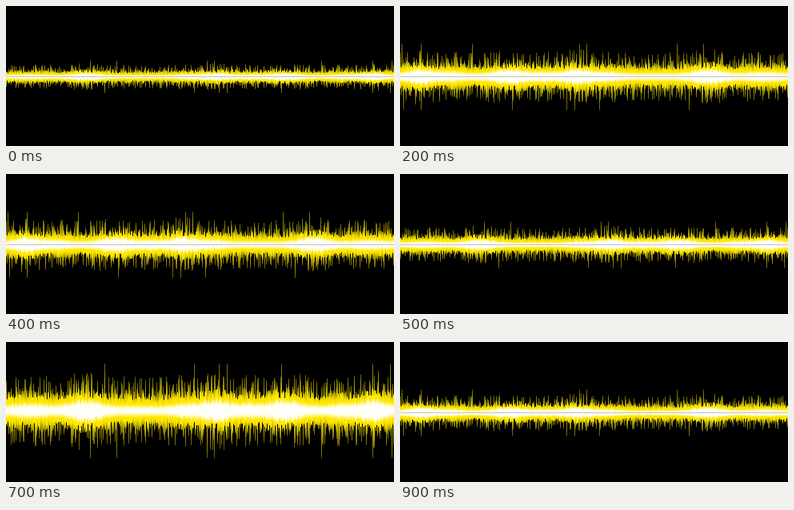
Write an HTML page with a canvas that moves like this. It is 485 by 175 pixels and loops after 1 s.

```html
<!DOCTYPE html>
<html lang="en">
<head>
<meta charset="utf-8">
<title>Sound wave</title>
<style>
html, body { margin: 0; height: 100%; overflow: hidden; background: #000; }
canvas { display: block; }
</style>
</head>
<body>
<canvas width="485" height="175"></canvas>
<script>
const W = 485, H = 175, STEP = 100, STEPS = 10;
const ctx = document.querySelector('canvas').getContext('2d');

let seed = 7;
function random() {
  seed = (seed * 1664525 + 1013904223) % 4294967296;
  return seed / 4294967296;
}

const bump = (x, centre, width) => Math.exp(-(((x - centre) / width) ** 2));
const loudness = x => Math.min(1,
  bump(x, 25, 20) + bump(x, 137, 24) + bump(x, 220, 21) + bump(x, 385, 23) +
  .4 * (bump(x, 62, 20) + bump(x, 180, 14) + bump(x, 258, 20) + bump(x, 455, 24)));

// One vertical line of the wave, in units of the half height
function makeColumn(x, tall) {
  const loud = loudness(x);
  const spike = random() < .5 ? .4 + .4 * random() ** 1.3 : .24 + .2 * random();
  const height = tall ? .97 : spike * (.9 + .13 * loud);
  const white = (.035 + .125 * loud) * (.65 + .6 * random());
  const body = white + .1 + .12 * random();
  const fill = ctx.createLinearGradient(0, 0, 0, 1);
  const stop = (at, colour) => fill.addColorStop(Math.min(1, at), colour);
  stop(0, '#fff');
  stop(white, '#fffff0');
  stop(white + .07, '#fff04a');
  stop(white + .1, '#ffe600');
  stop(Math.max(body, white + .1), '#ffe600');
  stop(body + .09, `rgba(235,218,0,${.72 + .25 * random()})`);
  stop(Math.max(height, body + .1), 'rgba(235,218,0,.42)');
  return { x, height, fill };
}

const makeSide = peaks => Array.from({ length: W }, (_, x) => makeColumn(x, peaks.includes(x)));
const upper = makeSide([2, 26, 90, 224, 233, 346, 379]);
const lower = makeSide([4, 26, 140, 208, 218, 249, 361]);

function drawSide(columns, mirrored, centre, scale) {
  ctx.setTransform(mirrored ? -1 : 1, 0, 0, scale, mirrored ? W : 0, centre);
  for (const { x, height, fill } of columns) {
    ctx.fillStyle = fill;
    ctx.fillRect(x, 0, 1, height);
  }
}

// The wave is loudest, and upside down, at steps 3 and 7
function draw(step) {
  const away = Math.min(Math.abs(step - 3), Math.abs(step - 7), Math.abs(step - 13));
  const amp = 61 * .7 ** Math.min(away, Math.abs(step + 3));
  const centre = away ? 88.5 : 86;
  const mirrored = step === 0 || (step > 4 && step < 9);
  const up = away ? -amp : amp;
  ctx.setTransform(1, 0, 0, 1, 0, 0);
  ctx.fillStyle = '#000';
  ctx.fillRect(0, 0, W, H);
  drawSide(upper, mirrored, centre, up);
  drawSide(lower, mirrored, centre, -up);
}

let shown = -1;
function frame() {
  const step = Math.floor(performance.now() / STEP) % STEPS;
  if (step !== shown) draw(shown = step);
  requestAnimationFrame(frame);
}
frame();
</script>
</body>
</html>
```
